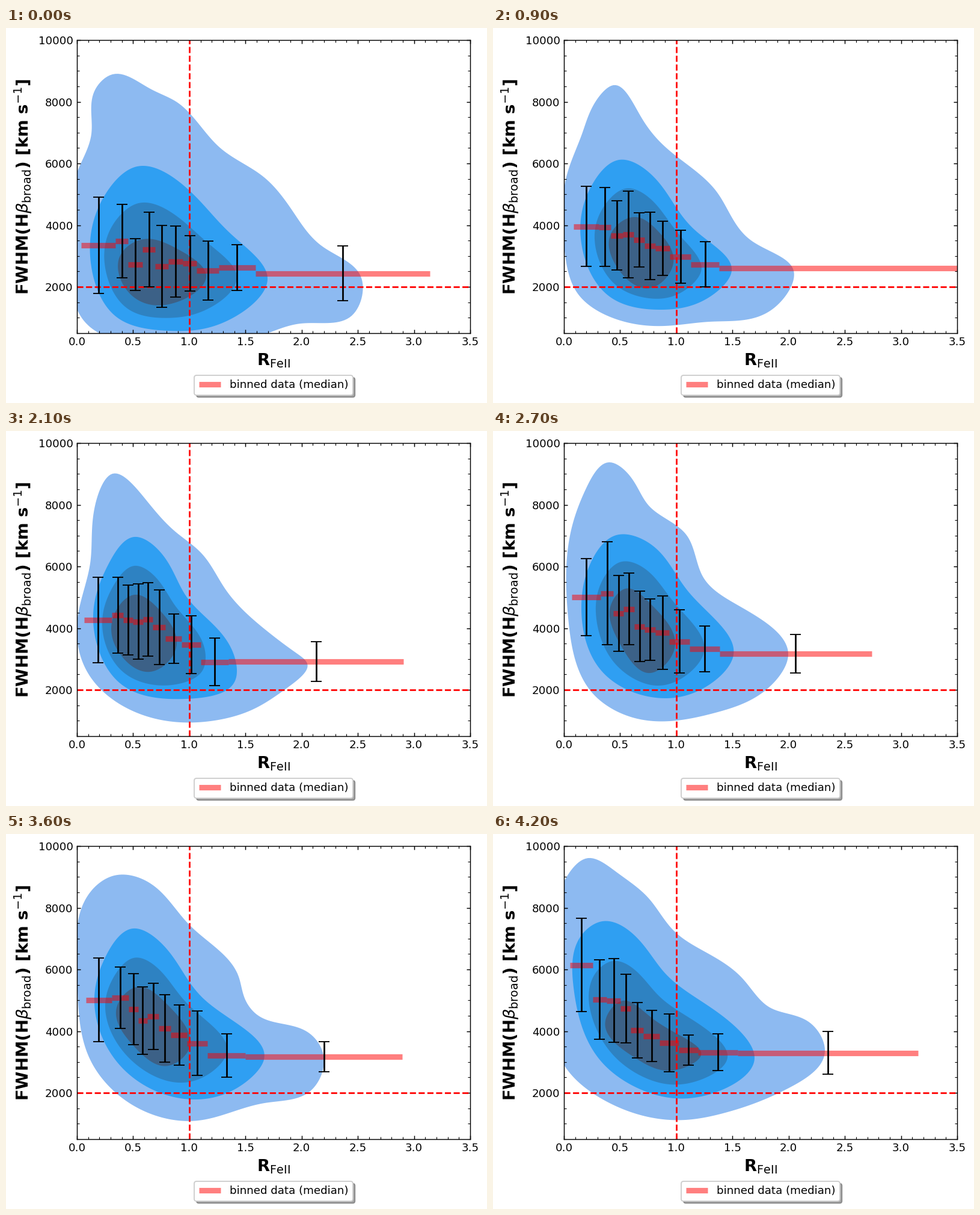
Animation, 800 px wide and 623 px high, one loop 4500 ms. Source, as a matplotlib script:

```python
import numpy as np
import matplotlib.pyplot as plt
from matplotlib.animation import FuncAnimation
from matplotlib.collections import LineCollection
from matplotlib.lines import Line2D
from matplotlib.patches import Polygon
from matplotlib.ticker import AutoMinorLocator

W, H = 800, 623
LEFT, RIGHT, TOP, BOTTOM = 118, 772, 20, 507
XMAX, YMIN, YMAX = 3.5, 500, 10000
FRAMES, INTERVAL = 15, 300
PT = 1.3185  # scale from base points to this figure's points
FILLS = ["#8dbaf1", "#2f9ff2", "#2e82c2", "#3c6187"]

plt.rcParams.update({
    "font.family": "DejaVu Sans",
    "font.size": 10 * PT,
    "axes.linewidth": 0.8 * PT,
    "patch.linewidth": 1.0 * PT,
})


def to_data(p):
    """Stage pixels to axes data."""
    p = np.asarray(p, float)
    x = (p[..., 0] - LEFT) / (RIGHT - LEFT) * XMAX
    y = YMIN + (BOTTOM - p[..., 1]) / (BOTTOM - TOP) * (YMAX - YMIN)
    return np.stack([x, y], axis=-1)


def smooth(flat, count=320):
    """Closed cubic spline through the points, evenly spaced along its length."""
    p = np.reshape(flat, (-1, 2)).astype(float)
    q = np.roll(p, -1, axis=0)
    h = np.hypot(*(q - p).T)
    a, b = 1 / h, 1 / np.roll(h, 1)
    v = (q - p) * (a**2)[:, None]
    k = np.arange(len(p))
    system = np.zeros((len(p), len(p)))
    system[k, k] = 2 * (a + b)
    system[k, k - 1] = b
    system[k, (k + 1) % len(p)] = a
    m = np.linalg.solve(system, 3 * (v + np.roll(v, 1, axis=0)))
    n = np.roll(m, -1, axis=0)
    s = np.linspace(0, 1, 20, endpoint=False)[None, :, None]
    p, q, m, n, h = (u[:, None, :] for u in (p, q, m, n, h[:, None]))
    curve = ((2 * s**3 - 3 * s**2 + 1) * p + (s**3 - 2 * s**2 + s) * h * m
             + (3 * s**2 - 2 * s**3) * q + (s**3 - s**2) * h * n).reshape(-1, 2)
    curve = np.vstack([curve, curve[:1]])
    length = np.r_[0, np.cumsum(np.hypot(*np.diff(curve, axis=0).T))]
    at = np.linspace(0, length[-1], count, endpoint=False)
    return np.stack([np.interp(at, length, c) for c in curve.T], axis=-1)


poses = {}


def pose(step, outer, middle, core, edges, median, high):
    """Contours run clockwise from their top; all values in stage pixels."""
    outer, middle, core = (smooth(c) for c in (outer, middle, core))
    rings = np.array([outer, middle, (middle + core) / 2, core])
    poses[step] = rings, np.array(edges, float), np.array([median, high], float)


pose(0,
     [177, 77, 240, 101, 284, 123, 356, 199, 428, 247, 478, 306, 525, 362,
      591, 415, 575, 478, 490, 491, 430, 509, 270, 530, 130, 487, 104, 360,
      118, 240, 142, 176, 147, 105],
     [218, 230, 305, 270, 375, 343, 435, 415, 360, 490, 270, 503, 185, 481,
      141, 390, 166, 275],
     [223, 352, 285, 367, 333, 411, 265, 460, 203, 438, 189, 380],
     [125, 182, 203, 227, 248, 270, 294, 317, 354, 415, 705],
     [361, 354, 393, 368, 396, 388, 391, 403, 398, 407.5],
     [281, 293, 350, 306, 328, 329, 345, 354, 360, 362])

pose(3,
     [200, 95, 247, 149, 305, 213, 372, 272, 428, 352, 500, 403, 465, 467,
      360, 488, 285, 495, 200, 482, 140, 440, 119, 370, 124, 240, 148, 176,
      172, 120],
     [210, 219, 265, 245, 335, 335, 397, 403, 360, 447, 280, 468, 195, 447,
      146, 350, 165, 260],
     [235, 314, 275, 338, 300, 390, 262, 432, 203, 392, 196, 342],
     [134, 176, 196, 216, 234, 252, 270, 294, 329, 376, 1240],
     [329.5, 330.5, 344.5, 343, 352, 362, 366, 380, 392.5, 399],
     [263, 265, 287, 271, 307, 306, 321, 336, 355, 360])

pose(5,
     [194, 102, 240, 128, 330, 203, 355, 257, 440, 328, 484, 400, 425, 455,
      340, 487, 205, 473, 138, 395, 125, 275, 146, 182, 172, 118],
     [202, 210, 250, 231, 325, 275, 365, 350, 383, 395, 325, 453, 215, 440,
      157, 350, 165, 250],
     [211, 287, 262, 312, 299, 380, 270, 409, 215, 380, 187, 315],
     [132, 181, 199, 217, 232, 252, 271, 297, 328, 376, 703],
     [297, 316, 321, 330, 349, 350, 358, 367, 380, 389],
     [238, 255, 269, 283, 296, 298, 308, 324, 344, 359])

pose(7,
     [177, 71, 235, 117, 285, 170, 325, 203, 365, 263, 435, 333, 483, 369,
      501, 386, 470, 425, 395, 469, 340, 482, 215, 467, 135, 400, 118, 320,
      140, 220, 149, 120],
     [213, 176, 260, 205, 300, 275, 375, 362, 381, 415, 300, 445, 185, 415,
      145, 315, 170, 222],
     [214, 272, 255, 297, 283, 360, 240, 400, 188, 368, 178, 310],
     [130, 176, 195, 211, 228, 244, 265, 292, 324, 370, 661],
     [314, 306, 314, 316.5, 313, 326, 345, 355, 383.5, 383],
     [243, 243, 256, 254, 252, 264, 304, 307, 344, 350])

pose(9,
     [193, 52, 228, 75, 260, 125, 322, 173, 348, 240, 410, 291, 491, 373,
      460, 425, 370, 468, 240, 478, 165, 435, 125, 310, 124, 200, 155, 95],
     [205, 173, 265, 190, 325, 267, 400, 372, 345, 430, 270, 443, 180, 398,
      147, 290, 162, 220],
     [220, 262, 260, 285, 301, 365, 262, 402, 212, 355, 199, 282],
     [130.5, 179, 200, 217, 235, 252, 270, 293, 327, 377, 630],
     [276, 269.5, 303, 295.5, 324.5, 330, 335, 349.5, 362, 370],
     [212, 184, 240, 236, 266, 279, 274, 297, 324, 338])

pose(12,
     [180, 69, 240, 82, 305, 151, 387, 237, 397, 273, 420, 302, 500, 328,
      528, 368, 505, 428, 430, 447, 320, 476, 210, 450, 140, 375, 118, 235,
      143, 93],
     [211, 157, 260, 183, 330, 275, 429, 375, 395, 415, 310, 441, 190, 385,
      147, 280, 165, 205],
     [218, 254, 265, 280, 304, 358, 270, 385, 215, 355, 185, 285],
     [132.5, 175.5, 204, 220, 235, 254, 274, 301, 335, 398, 659],
     [275.5, 272, 291, 310, 303, 323, 334, 347.5, 368, 370],
     [206, 221, 232, 254, 248, 267, 284, 294, 332, 345])

pose(14,
     [158, 40, 205, 63, 260, 108, 300, 160, 355, 197, 415, 240, 460, 288,
      525, 312, 552, 362, 490, 423, 390, 462, 320, 475, 190, 445, 117, 382,
      95, 230, 118, 79],
     [182, 145, 235, 168, 285, 230, 395, 313, 435, 373, 355, 434, 260, 430,
      180, 378, 134, 255, 148, 167],
     [212, 278, 270, 310, 345, 370, 305, 392, 235, 371, 187, 310],
     [128, 165.5, 189, 212, 229, 250, 277, 309, 341, 407, 707],
     [217.5, 275, 276.5, 290, 326, 335.5, 347, 359, 362.5, 363.5],
     [140, 209, 207, 233, 280, 293, 299, 334, 332, 328])


def pose_at(frame):
    """Stored pose, or a blend of its two neighbours."""
    a = max(k for k in poses if k <= frame)
    b = min(k for k in poses if k >= frame)
    f = (frame - a) / (b - a) if b > a else 0
    return [(1 - f) * u + f * v for u, v in zip(poses[a], poses[b])]


fig = plt.figure(figsize=(8, 6.23), dpi=100, facecolor="white")
ax = fig.add_axes([LEFT / W, 1 - BOTTOM / H, (RIGHT - LEFT) / W, (BOTTOM - TOP) / H])
ax.set_xlim(0, XMAX)
ax.set_ylim(YMIN, YMAX)
ax.set_yticks(range(2000, 10001, 2000))
ax.xaxis.set_minor_locator(AutoMinorLocator(5))
ax.yaxis.set_minor_locator(AutoMinorLocator(4))
ax.tick_params(which="both", direction="in", top=True, right=True, pad=3.5 * PT)
ax.tick_params(which="major", length=3.5 * PT, width=0.8 * PT)
ax.tick_params(which="minor", length=2 * PT, width=0.6 * PT)
label = dict(fontsize=15 * PT, fontweight="bold", labelpad=4 * PT)
ax.set_xlabel(r"R$_{\rm{FeII}}$", **label)
ax.set_ylabel(r"FWHM(H$\beta_{\rm{broad}}$) [km s$^{-1}$]", **label)

guide = dict(color="red", ls="--", lw=1.5 * PT, zorder=2)
ax.axhline(2000, **guide)
ax.axvline(1, **guide)

shapes = [Polygon([(0, 0), (1, 0), (1, 1)], fc=c, ec="none", lw=0, zorder=1)
          for c in FILLS]
for shape in shapes:
    ax.add_patch(shape)
bars = LineCollection([], colors="red", alpha=0.5, linewidths=5 * PT, zorder=2.1)
stems = LineCollection([], colors="black", linewidths=1.5 * PT, zorder=2.2)
ax.add_collection(bars, autolim=False)
ax.add_collection(stems, autolim=False)
caps, = ax.plot([], [], "_", color="black", ms=10 * PT, mew=1.0 * PT, zorder=2.2)

handle = Line2D([], [], color="red", alpha=0.5, lw=5 * PT, solid_capstyle="butt")
ax.legend([handle], ["binned data (median)"], loc="upper center",
          bbox_to_anchor=(0.5, -0.125), fancybox=True,
          shadow={"ox": 2 * PT, "oy": -2 * PT})


def segments(x0, y0, x1, y1):
    ends = [np.stack([x0, y0], axis=-1), np.stack([x1, y1], axis=-1)]
    return to_data(np.stack(ends, axis=1))


def draw(frame):
    rings, edges, (median, high) = pose_at(frame)
    for shape, ring in zip(shapes, rings):
        shape.set_xy(to_data(ring))
    mid = (edges[:-1] + edges[1:]) / 2
    bars.set_segments(segments(edges[:-1], median, edges[1:], median))
    lines = segments(mid, high, mid, 2 * median - high)
    stems.set_segments(lines)
    caps.set_data(*lines.reshape(-1, 2).T)
    return [*shapes, bars, stems, caps]


anim = FuncAnimation(fig, draw, frames=FRAMES, interval=INTERVAL,
                     repeat=True, repeat_delay=0, blit=False)
plt.show()
```
